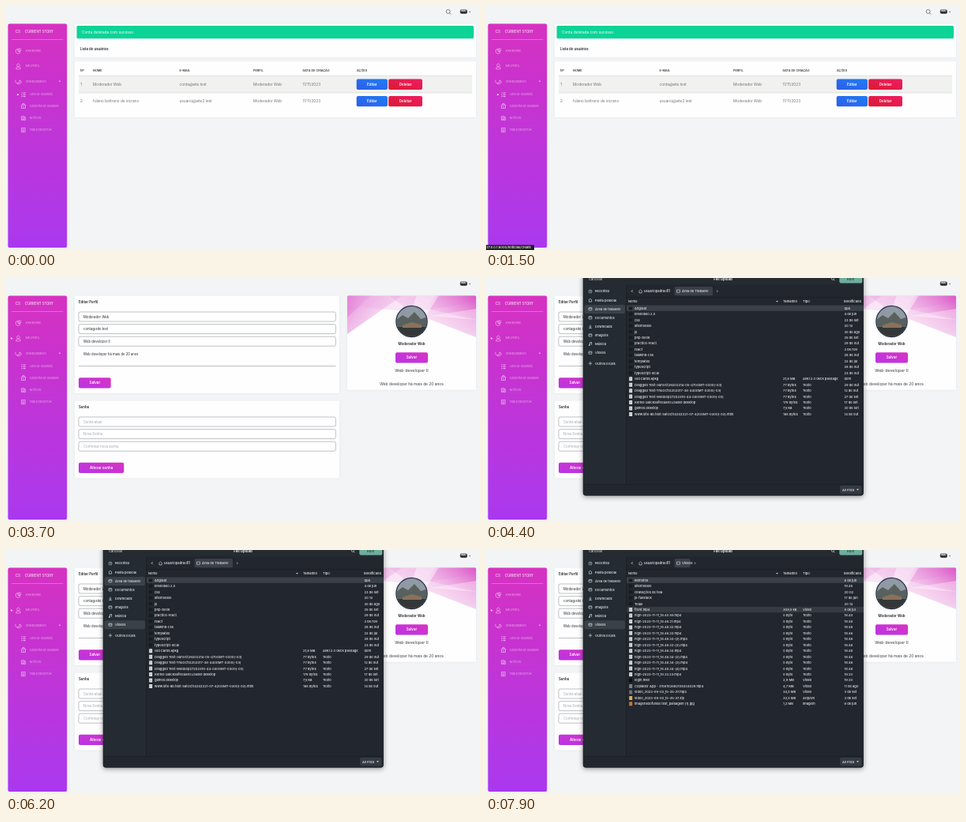
An HTML page for the animation above (8 s loop, 600 by 309 pixels).

```html
<!DOCTYPE html>
<html lang="pt-BR">
<head>
<meta charset="utf-8">
<title>Painel de usuários</title>
<style>
html, body { margin: 0; width: 100%; height: 100%; overflow: hidden; background: #f3f4f5; }
svg { display: block; width: 100vw; height: 100vh; font-family: Inter, "Open Sans", sans-serif; }
</style>
</head>
<body>
<svg id="stage" viewBox="0 0 600 309" preserveAspectRatio="none"></svg>
<script>
const LOOP = 8000;
const TIMES = { linkHover: 1200, profile: 1700, dialog: 4000, hoverVideos: 5700, openVideos: 6700 };
const ROLE = "Moderador Web";
const EMAIL = "conta@site.test";
const BIO = "Web developer há mais de 20 anos";

const rect = (x, y, w, h, fill, r = 0, extra = "") =>
  `<rect x="${x}" y="${y}" width="${w}" height="${h}" rx="${r}" fill="${fill}" ${extra}/>`;
// y is the vertical middle of the capitals
const text = (x, y, s, size, fill = "#222a42", weight = 400, anchor = "start") =>
  `<text x="${x}" y="${y + size * 0.36}" font-size="${size}" fill="${fill}" font-weight="${weight}" text-anchor="${anchor}">${s}</text>`;
const path = (d, stroke, width = 0.6, fill = "none") =>
  `<path d="${d}" stroke="${stroke}" stroke-width="${width}" fill="${fill}"/>`;
const caret = (x, y, fill, s = 1.4) =>
  `<path d="M${x - s} ${y - s / 2}h${2 * s}l${-s} ${s * 1.2}z" fill="${fill}"/>`;
const group = (id, body) => `<g id="${id}">${body}</g>`;
const card = (x, y, w, h) => rect(x, y, w, h, "#fefefe", 1.5, 'filter="url(#soft)"');
const button = (x, y, w, h, label, paint, size = 4.5) =>
  rect(x, y, w, h, `url(#${paint})`, 2) + text(x + w / 2, y + h / 2, label, size, "#fff", 600, "middle");
const gradient = (id, coords, ...stops) =>
  `<linearGradient id="${id}" ${coords}>` + stops.map(([o, c, a = 1]) =>
    `<stop offset="${o}" stop-color="${c}" stop-opacity="${a}"/>`).join("") + "</linearGradient>";

const diagonal = 'x1="1" y1="0" x2="0" y2="1"';
const defs = `<defs>
  ${gradient("side", 'x1="0" y1="0" x2="0" y2="1"', [0, "#d630c1"], [1, "#aa39ef"])}
  ${gradient("pink", diagonal, [0, "#d932c3"], [1, "#b735e6"])}
  ${gradient("blue", diagonal, [0, "#1d7df5"], [1, "#2f5dea"])}
  ${gradient("red", diagonal, [0, "#ef1d63"], [1, "#d91b32"])}
  ${gradient("rayL", 'x1="0" y1="0" x2="1" y2="0.5"', [0, "#df6bd0", 0.75], [1, "#e79bdc", 0.15])}
  ${gradient("rayR", 'x1="1" y1="0" x2="0" y2="0.6"', [0, "#d94cc4", 0.85], [1, "#eda9e2", 0.2])}
  <filter id="soft" x="-10%" y="-10%" width="120%" height="125%"><feDropShadow dx="0" dy="0.3" stdDeviation="1.5" flood-opacity=".05"/></filter>
  <filter id="deep" x="-20%" y="-20%" width="140%" height="140%"><feDropShadow dx="0" dy="1.5" stdDeviation="3" flood-opacity=".4"/></filter>
  <clipPath id="cardTop"><rect x="432" y="22.5" width="163" height="119" rx="1.5"/></clipPath>
  <clipPath id="face"><circle cx="513.5" cy="55" r="19"/></clipPath>
</defs>`;

function sidebar() {
  const white = "rgba(255,255,255,.82)";
  const item = (x, y, s, size = 3) => text(x, y, s, size, white, 300);
  const icons = path("M15 54.3a3 3 0 1 0 3.2 3.2h-3.2zM16.2 53.6v2.8h2.7a2.7 2.7 0 0 0-2.7-2.8", white, 0.55) +
    path("M15.5 73.2a1.7 1.7 0 1 1-.01 0M12.8 79.8v-1a2.7 1.8 0 0 1 5.4 0v1z", white, 0.55) +
    path("M12 93.5v3l4 2.5 3-1.7v-2.3l-2-1v2.5l-3 1.6", white, 0.55) +
    path("M19.3 110h1.2m1.1 0h3.2M19.3 112.3h1.2m1.1 0h3.2M19.3 114.6h1.2m1.1 0h3.2", white, 0.8) +
    path("M19.7 125.3h4.8v4.2h-4.8zM21 125v-1.4h2.2v1.4M21 127.7h2.2", white, 0.6) +
    path("M19.5 139.7h3.8v4.8h-3.8zM23.3 141h1.4v3.5h-1.4M20.3 141h2.2M20.3 142.3h2.2M20.3 143.5h2.2", white, 0.5) +
    path("M19.7 154.4h4.5v5.3h-4.5zM20.6 156h2.7M20.6 157.3h2.7M20.6 158.5h1.7", white, 0.55);
  return rect(2.5, 22.5, 74.7, 283.5, "url(#side)", 2, 'filter="url(#soft)"') +
    text(12, 32.5, "CS", 4.3, "#fff") + text(24, 32.5, "CURRENT STORY", 4.3, "#fff") +
    path("M7 42.5h65.5", "rgba(255,255,255,.55)", 0.5) + icons + caret(68, 95.3, "#fff", 1.1) +
    item(25, 57.2, "DASHBOARD", 3.1) + item(25, 76.3, "MEU PERFIL") + item(25, 95.7, "GERENCIAMENTO") +
    item(30, 112, "LISTA DE USUÁRIOS") + item(30, 127.2, "CADASTRO DE USUÁRIOS") +
    item(30, 142, "NOTÍCIAS", 3.1) + item(30, 157, "PUBLICAR NOTÍCIA");
}

function topbar() {
  return rect(574.7, 4.6, 9.3, 5.2, "#4b4f54", 2) + rect(576, 5, 6, 2, "#a4abb0", 1) +
    rect(575.3, 7.4, 8, 1.8, "#24272b", 0.8) + caret(587.2, 7.5, "#333", 1);
}

function usersPage() {
  const columns = [94, 110, 219.5, 313, 375.5, 444];
  const heads = ["Nº", "NOME", "E-MAIL", "PERFIL", "DATA DE CRIAÇÃO", "AÇÕES"];
  const rows = [
    ["1", ROLE, EMAIL, ROLE, "11/11/2023"],
    ["2", "fulano beltrano de sicrano", "usuario@site2.test", ROLE, "11/11/2023"]
  ];
  const row = (cells, i) => {
    const y = 99.2 + i * 21.3;
    return cells.map((s, c) => text(columns[c], y, s, 4.8, "#4d5158", 300)).join("") +
      button(443.7, y - 6.6, 39.3, 13.4, "Editar", "blue") + button(484.2, y - 6.6, 42.8, 13.4, "Deletar", "red");
  };
  return card(87, 22.5, 508, 42.5) + rect(89.5, 25, 502.5, 16.3, "#0dd397", 1.5) +
    text(96, 33.2, "Conta deletada com sucesso.", 4.75, "#fff") +
    text(94, 54, "Lista de usuários", 4.35, "#24262b", 600) + card(87, 70, 508, 71) +
    rect(92, 88.5, 498, 21.5, "#f1f1f0") + path("M92 88.4h498M92 110h498", "#cfd1d4", 0.6) +
    heads.map((s, c) => text(columns[c], 81.6, s, 3.8, "#3a3d44", 600)).join("") +
    rows.map(row).join("") +
    path("M562.2 7a2.5 2.5 0 1 1-5 0a2.5 2.5 0 1 1 5 0M561.4 8.8l2 2", "#555", 0.7) +
    '<circle cx="14.9" cy="112.2" r="1" fill="#fff"/>';
}

function profilePage() {
  const field = (y, s, color) => rect(92, y, 325.3, 12, "#fff", 2, 'stroke="#a3a6ac" stroke-width=".7"') +
    text(98, y + 6.2, s, 4.25, color);
  const fields = (y, list, color) => list.map((s, i) => field(y + i * 15.6, s, color)).join("");
  const rays = `<g clip-path="url(#cardTop)">
    <path d="M432 22h70l-70 49z" fill="url(#rayL)"/><path d="M432 22h30l-30 28z" fill="url(#rayL)"/>
    <path d="M432 22h163v9l-80 12-83-8z" fill="#e9a0de" opacity=".28"/>
    <path d="M485 22h110v53l-83-32z" fill="url(#rayR)" opacity=".65"/>
    <path d="M544 22h51v31l-62-14z" fill="url(#rayR)"/><path d="M520 22h28l-16 25-20-3z" fill="#fff" opacity=".45"/>
    <path d="M595 39v14l-58-5z" fill="#fff" opacity=".35"/></g>`;
  const photo = `<circle cx="513.5" cy="55" r="20.3" fill="#27324d"/><g clip-path="url(#face)">
    <rect x="494" y="35" width="40" height="41" fill="#8f9aa3"/><path d="M494 53l8-6 7 4 8-8 8 9 10-3v27h-41z" fill="#59615f"/>
    <path d="M494 62h40v14h-40z" fill="#343735"/><path d="M502 60l11-4 13 3v4h-24z" fill="#8a715c"/></g>`;
  return card(87, 22.5, 335, 123.5) + text(92, 30.5, "Editar Perfil", 4.3, "#222", 600) +
    fields(43, [ROLE, EMAIL, "Web developer II"], "#292b33") +
    text(98, 96.8, BIO, 4.2, "#292b33") + path("M92 111.5h325.5", "#a3a6ac", 0.7) +
    button(92, 126.2, 40.7, 13.3, "Salvar", "pink") +
    card(87, 155.5, 335, 97.8) + text(92, 163.4, "Senha", 4.3, "#222", 600) +
    fields(176, ["Senha atual", "Nova Senha", "Confirmar nova senha"], "#a4a6ab") +
    button(92, 233.8, 57.3, 13.3, "Alterar senha", "pink") +
    card(432, 22.5, 163, 119) + rays + photo +
    text(513.5, 83.7, ROLE, 4.4, "#222", 600, "middle") +
    button(493, 94.2, 41, 13.3, "Salvar", "pink") +
    text(513.5, 117, "Web developer II", 5.35, "#3b3d42", 400, "middle") +
    text(513.5, 134, BIO, 4.85, "#3b3d42", 400, "middle") +
    '<path d="M6.3 74.9l2.2 1.5-2.2 1.5z" fill="#fff"/>';
}

const LIGHT = "#e6e9ec";
const label = (x, y, s, size = 4.1, weight = 500) => text(x, y, s, size, LIGHT, weight);

function fileRows(entries) {
  return entries.map(([name, date, size = "", type = "", icon = "#dfe3e5"], i) => {
    const y = 38.2 + i * 7.46;
    const mark = size
      ? rect(181.2, y - 2.5, 4, 5, icon, 0.5) + (icon === "#dfe3e5" ? path(`M182 ${y - 0.8}h2.4m-2.4 1.4h2.4`, "#7e878d", 0.4) : "")
      : rect(180.7, y - 1.8, 4.8, 3.8, "#161b20", 0.6);
    return mark + label(188, y, name) + label(376, y, size) + label(401, y, type) + label(453.5, y, date);
  }).join("");
}

const drag = (s, date) => [`Dragged Text-${s}GMT-0300(-03)`, date, "77 bytes", "Texto"];
const clip = (s, date) => [`high-2023-11-11_${s}.mp4`, date, "0 byte", "Texto"];

const deskFiles = [
  ["Angular", "qua"], ["brModelo.2.0", "4 de jun"], ["css", "23 de set"], ["sitemodelo", "20:13"],
  ["js", "30 de ago"], ["php-book", "25 de set"], ["practice-react", "29 de out"], ["react", "2 de nov"],
  ["tailwind-css", "28 de out"], ["templates", "22 de jul"], ["typescript", "28 de out"], ["typescript-local", "23 de out"],
  ["Old Cards.apkg", "dom", "21,8 MB", "Anki 2.0 deck package"],
  drag("SunOct29202314-05-470", "29 de out"), drag("ThuOct12202317-38-440", "12 de out"),
  drag("WedSep27202319-44-040", "27 de set"),
  ["Kernel QuickSafeGuard Loader.desktop", "17 de set", "179 bytes", "Texto"],
  ["games.desktop", "30 de set", "7,5 kB", "Texto"],
  ["www.site-ab.test-SatOct14202321-07-420GMT-0300(-03).html", "14 de out", "165 bytes", "Texto"]
];

const videoFiles = [
  ["Remotos", "6 de jun"], ["sitemodelo", "19:45"], ["Gravações de tela", "20:02"], ["js-fullstack", "17 de jun"], ["Telas", "20:14"],
  ["front.mp4", "9 de jul", "309,5 kB", "Vídeo"], clip("18.40.59", "18:40"),
  ...["21", "32", "33", "33-(2)", "33-(3)", "34", "34-(2)", "34-(3)", "34-(4)"].map(s => clip("18.46." + s, "18:46")),
  clip("19.33.33", "19:33"),
  ["login.mkv", "19:20", "2,9 MB", "Vídeo", "#0c0e10"],
  ["Copiador App - 3156192682108334029.mp4", "11 de ago", "4,7 MB", "Vídeo", "#7a8187"],
  ["video_2023-09-03_15-35-37.mp4", "3 de set", "34,5 MB", "Vídeo", "#68717b"],
  ["video_2023-09-03_15-35-37.zip", "3 de set", "33,5 MB", "Arquivo", "#d5b258"],
  ["imagensdofundo.test_paisagem (1).jpg", "6 de jun", "1,2 MB", "Imagem", "#cf7135"]
];

function dialog() {
  const places = ["Recentes", "Pasta pessoal", "Área de trabalho", "Documentos", "Downloads", "Imagens", "Música", "Vídeos"];
  const placeIcon = (i, y) => i === 0 ? path(`M134 ${y}a2 2 0 1 1-4 0a2 2 0 1 1 4 0M132 ${y - 1.2}v1.3h1`, LIGHT, 0.5)
    : i === 1 ? path(`M129.8 ${y}l2.2-2 2.2 2M130.5 ${y}v2h3v-2`, LIGHT, 0.6)
    : i === 4 ? path(`M132 ${y - 2}v3m-1.3-1.2l1.3 1.3 1.3-1.3M130 ${y + 2}h4`, LIGHT, 0.6)
    : i === 6 ? path(`M131.4 ${y + 1.5}v-3.2l2.2-.5v3.2`, LIGHT, 0.7) + `<circle cx="130.8" cy="${y + 1.5}" r=".8" fill="${LIGHT}"/>`
    : rect(130, y - 1.6, 4, 3.2, "none", 0.5, `stroke="${LIGHT}" stroke-width=".6"`) + path(`M130 ${y - 0.6}h4`, LIGHT, 0.5);
  const shade = (id, y) => group(id, rect(124.5, y - 5.5, 51.5, 11, "#3a4149", 2));
  const crumb = (w, s) => rect(238.7, 11, w, 11.3, "#3a4149", 2) +
    rect(241.5, 15, 4, 3.3, "none", 0.5, `stroke="${LIGHT}" stroke-width=".6"`) + label(248, 16.7, s) +
    path(`M${243.8 + w} 15.4l1.3 1.3-1.3 1.3`, LIGHT);
  return rect(122.7, -12, 355.3, 287.7, "#20272e", 4, 'filter="url(#deep)"') +
    rect(123, 0, 54.5, 261, "#242b32") + rect(123, 0, 355, 8.5, "#242b32") +
    path("M177.5 8.5v252.7M123 261.2h355", "#171c21", 0.6) +
    text(130, 1.2, "Cancelar", 4.1, "#c9cdd1", 500) + text(300, 1.2, "File Upload", 4.3, "#f1f3f4", 700, "middle") +
    path("M440.4 .8a1.5 1.5 0 1 1-3 0a1.5 1.5 0 1 1 3 0M440 2l1.3 1.4", LIGHT) +
    rect(447.3, -6, 29, 12.5, "#6eae9d", 2) + text(461.8, 1.2, "Abrir", 4.2, "#24463f", 500, "middle") +
    shade("shadeDesk", 39.4) + shade("shadeVideos", 94.7) +
    places.map((s, i) => placeIcon(i, 17 + i * 11.1) + label(138, 17 + i * 11.1, s)).join("") +
    path("M132 106v4.4m-2.2-2.2h4.4", LIGHT) + label(138, 108.2, "Outros locais") +
    path("M185.7 15.1l-1.5 1.5 1.5 1.5", LIGHT, 0.8) + path("M193.3 16.9l2.3-2.2 2.3 2.2M194 16.9v2h3.2v-2", LIGHT) +
    label(200, 16.7, "usuariopadrao01", 4.15) +
    path("M178 24.7h300M178 34.2h300", "#181d22", 0.5) +
    label(180, 29.6, "Nome") + caret(368.5, 29.6, LIGHT) + label(376, 29.6, "Tamanho") +
    label(401, 29.6, "Tipo") + label(453, 29.6, "Modificado", 4.1) +
    rect(178, 34.5, 300, 7.3, "#3a4148") +
    group("deskList", crumb(48.3, "Área de Trabalho") + fileRows(deskFiles)) +
    group("videoList", crumb(20, "Vídeos") + rect(178, 71.8, 300, 7.4, "#343b42") + fileRows(videoFiles)) +
    rect(448, 262.8, 27.5, 10.7, "#343b43", 2) + label(451, 268.1, "All Files") + caret(470.5, 268, LIGHT);
}

const stage = document.getElementById("stage");
stage.innerHTML = defs + rect(0, 0, 600, 309, "#f3f4f5") + sidebar() + topbar() +
  group("users", usersPage()) + group("profile", profilePage()) +
  group("status", rect(0, 302.6, 61, 6.4, "#1e1f24") + text(-1.5, 305.9, "127.0.0.1:8000/noticias/create", 4.1, "#fff", 500)) +
  group("dialog", dialog());

const show = (id, on) => document.getElementById(id).setAttribute("display", on ? "inline" : "none");

function render(t) {
  const inProfile = t >= TIMES.profile;
  const inVideos = t >= TIMES.openVideos;
  show("users", !inProfile);
  show("profile", inProfile);
  show("status", t >= TIMES.linkHover && !inProfile);
  show("dialog", t >= TIMES.dialog);
  show("shadeDesk", !inVideos);
  show("shadeVideos", t >= TIMES.hoverVideos);
  show("deskList", !inVideos);
  show("videoList", inVideos);
}

const start = performance.now();
function tick() {
  render((performance.now() - start) % LOOP);
  requestAnimationFrame(tick);
}
tick();
</script>
</body>
</html>
```
